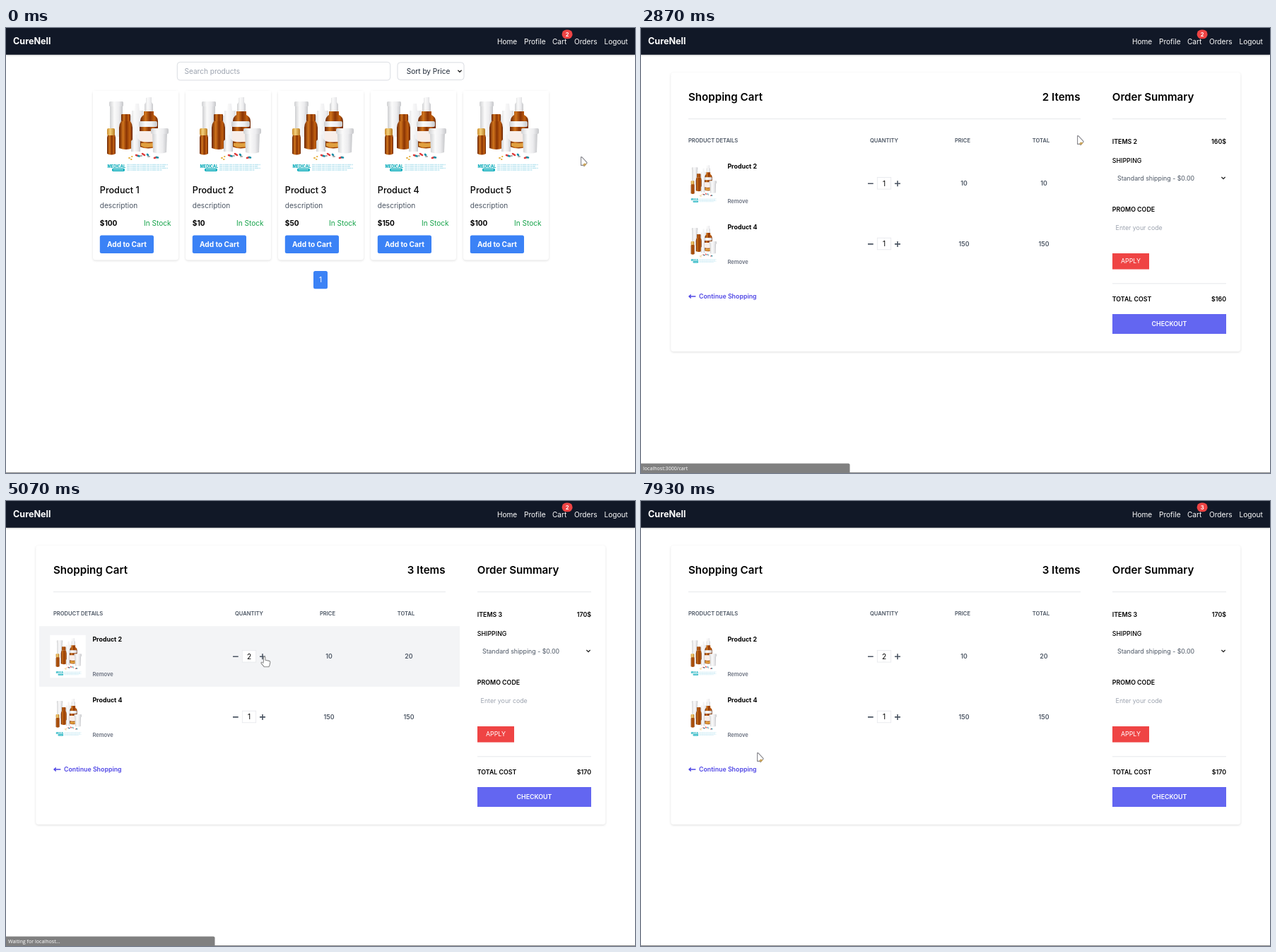
Animation, 890 px wide and 630 px high, one loop 8000 ms. Source, as an HTML page:

```html
<!DOCTYPE html>
<html lang="en">
<head>
<meta charset="utf-8">
<title>Shop</title>
<style>
html, body { margin: 0; width: 100%; height: 100%; overflow: hidden; background: #fff; }
svg { display: block; width: 890px; height: 630px; font-family: Inter, sans-serif; }
.card { fill: #fff; filter: drop-shadow(0 1.8px 1.5px rgba(0,0,0,.13)); }
.status { font-family: "Open Sans", sans-serif; }
</style>
</head>
<body>
<svg viewBox="0 0 890 630">
  <defs>
    <linearGradient id="amber">
      <stop offset="0" stop-color="#6b2504"/><stop offset=".3" stop-color="#d0741c"/>
      <stop offset=".55" stop-color="#8a3505"/><stop offset=".8" stop-color="#c2600f"/><stop offset="1" stop-color="#6b2504"/>
    </linearGradient>
    <linearGradient id="white">
      <stop offset="0" stop-color="#cfd0d2"/><stop offset=".35" stop-color="#fafafa"/>
      <stop offset=".7" stop-color="#ececee"/><stop offset="1" stop-color="#c6c7ca"/>
    </linearGradient>
    <linearGradient id="gold">
      <stop offset="0" stop-color="#c98a2b"/><stop offset=".4" stop-color="#f3cf7a"/><stop offset="1" stop-color="#b97a20"/>
    </linearGradient>
    <g id="photo">
      <rect width="121" height="121" fill="#fff"/>
      <g fill="url(#white)">
        <rect x="24" y="19" width="18" height="46" rx="1.5"/>
        <rect x="23" y="15" width="20" height="7" rx="1.5"/>
        <path d="M60 18h5l1 10h5v7h4v41H50V35h5v-7h4z"/>
        <path d="M75 10l3-1h5v7l2 3v10H73V19l2-3z"/>
      </g>
      <path d="M72 29h14v5q6 3 6 9v35H67V43q0-6 5-9z" fill="url(#amber)"/>
      <g fill="url(#amber)">
        <path d="M40 43h13q3 4 3 9v29q-9 4-19 0V52q0-5 3-9z"/>
        <path d="M21 62h10l1 4v23q-6 3-12 0V66z"/>
        <path d="M66 50h24v29q-12 5-24 0z"/>
      </g>
      <rect x="40" y="33" width="13" height="10" rx="1" fill="url(#amber)"/>
      <rect x="20" y="53" width="11" height="10" rx="2" fill="url(#gold)"/>
      <path d="M66 57h24v14q-12 3-24 0z" fill="#f8eee9"/>
      <path d="M68 74h20v4q-10 4-20 0z" fill="#e0a040"/>
      <g fill="url(#white)">
        <rect x="65" y="43" width="26" height="8" rx="2"/>
        <path d="M84 59h21l-1 28q-9 3-19 0z"/>
        <rect x="82" y="53" width="25" height="8" rx="2"/>
        <path d="M58 62h5v5l4 4v15H54V71l4-4z"/>
      </g>
      <g stroke-width="2.6" stroke-linecap="round">
        <path d="M61 91l3 1M70 89l3 2M87 95l3-1" stroke="#df3c3c"/>
        <path d="M64 92l2 .5M90 94l2 .5M77 90l1 1" stroke="#168da5"/>
        <path d="M51 95h1M55 93h.5M54 97h.5" stroke="#e6b040" stroke-width="2"/>
        <path d="M67 92h2M78 93h2" stroke="#aaa" stroke-width="2"/>
      </g>
      <text x="20.5" y="108.6" font-size="5.6" font-weight="800" fill="#12aebc">MEDICAL</text>
      <rect x="27" y="109.7" width="18" height="4.2" rx="1.6" fill="#12aebc"/>
      <path d="M29 111.8h14" stroke="#d5f4f6" stroke-width="1.3" stroke-dasharray="1.5 .5"/>
      <path d="M48 104.5h58M48 107h54M48 109.5h58M48 112h50" stroke="#bfe6f1" stroke-width="1.3" stroke-dasharray="4 .7 2 .6 6 .8"/>
    </g>
  </defs>
  <g id="stage"></g>
</svg>
<script>
const stage = document.getElementById('stage');
const TICKS = 120, LOOP = 8000;
const BASE = 10.08, SMALL = 8.82, TINY = 7.56;   // text sizes
const INK = '#000', GRAY = '#4b5563', PALE = '#9ca3af', LINE = '#e5e7eb';
const BLUE = '#3b82f6', INDIGO = '#6366f1', RED = '#ef4444';

const text = (x, y, s, size = BASE, weight = 400, fill = INK, anchor = 'start') =>
  `<text x="${x}" y="${y}" font-size="${size}" font-weight="${weight}" fill="${fill}" text-anchor="${anchor}">${s}</text>`;
const rect = (x, y, w, h, fill, r = 0, more = '') =>
  `<rect x="${x}" y="${y}" width="${w}" height="${h}" rx="${r}" fill="${fill}" ${more}/>`;
const path = (d, color, w = 1, more = '') =>
  `<path d="${d}" stroke="${color}" stroke-width="${w}" fill="none" ${more}/>`;
const chevron = (x, y) => path(`M${x - 2.6} ${y - 1.3}l2.6 2.6l2.6-2.6`, '#222', 1.3);
const card = (x, y, w, h) => rect(x, y, w, h, '#fff', 4, 'class="card"');

// pointer stops: tick, x, y
const stops = [
  [0, 813, 182], [8, 813, 182], [20, 782.5, 19], [21, 782.5, 19], [23, 782.5, 18], [30, 782.5, 18],
  [40, 617, 152], [43, 617, 152], [54, 398, 290], [55, 396, 285], [63, 378, 224], [65, 366, 220],
  [83, 366, 220], [84, 366.5, 225], [96, 366.5, 225], [102, 700, 322], [104, 714, 326],
  [106, 717, 337], [107, 720, 351], [110, 738, 413], [113, 738, 413], [116, 460, 306], [119, 164, 356], [120, 164, 356]
];
function pointer(n) {
  const i = stops.findIndex((s, k) => n < (stops[k + 1] || [Infinity])[0]);
  const [t0, x0, y0] = stops[i], [t1, x1, y1] = stops[i + 1] || stops[i];
  let p = t1 > t0 ? (n - t0) / (t1 - t0) : 0;
  if (t1 - t0 > 5) p = p * p * (3 - 2 * p);
  return [x0 + (x1 - x0) * p, y0 + (y1 - y0) * p];
}

function header(count, shift, hot) {
  const links = [['Home', 695], ['Profile', 733], ['Cart', 773], ['Orders', 804], ['Logout', 846.5]];
  return rect(0, 0, 890, 37.8, '#111827', 0, 'style="filter:drop-shadow(0 1px 1px #0003)"') +
    text(10, 23.4, 'CureNell', 12.6, 700, '#fff') +
    links.map(([s, x]) => text(x - shift, 22.9, s, BASE, 400, hot && s == 'Cart' ? PALE : '#fff')).join('') +
    rect(786.6 - shift, 2.5, 15, 12.8, RED, 6.4) +
    text(794.1 - shift, 11.6, count, TINY, 700, '#fff', 'middle');
}

function shop() {
  const field = 'stroke="#d1d5db" stroke-width=".8"';
  let s = rect(242.3, 48.3, 301.4, 25.6, '#fff', 4, field) + text(252.5, 65, 'Search products', BASE, 400, PALE) +
    rect(554, 48.8, 94, 24.6, '#fff', 4, field) + text(566.8, 65, 'Sort by Price', BASE, 400, '#1f2937') + chevron(642, 61);
  [100, 10, 50, 150, 100].forEach((price, i) => {
    const x = 123 + 131 * i, left = x + 9.8;
    s += card(x, 89, 121, 239.5) + `<use href="#photo" x="${x}" y="89"/>` +
      text(left, 233.8, 'Product ' + (i + 1), 12.6, 500) +
      text(left, 254.6, 'description', BASE, 400, GRAY) +
      text(left, 279.6, '$' + price, BASE, 700) +
      text(x + 110.5, 279.6, 'In Stock', BASE, 400, '#16a34a', 'end') +
      rect(left, 293.5, 76.2, 25.4, BLUE, 2.5) + text(x + 48, 310, 'Add to Cart', BASE, 700, '#fff', 'middle');
  });
  return s + rect(435, 344, 20, 25.2, BLUE, 2.5) + text(445, 360.2, '1', BASE, 400, '#fff', 'middle');
}

function row(y, name, qty, price, hot) {
  const strong = (x, v) => text(x, y + 46.2, v, SMALL, 600, GRAY, 'middle');
  return (hot ? rect(47, y, 595, 85.7, '#f3f4f6') : '') +
    `<use href="#photo" transform="translate(62.3 ${y + 12.6}) scale(.417 .5)"/>` +
    text(122.4, y + 22, name, SMALL, 700) +
    text(122.4, y + 70.6, 'Remove', TINY, 600, '#6b7280') +
    path(`M321 ${y + 43}h7.7M359 ${y + 43}h8M363 ${y + 39}v8`, GRAY, 1.6) +
    rect(334.3, y + 34.3, 19.4, 16.6, '#fff', 0, `stroke="${LINE}" stroke-width=".8"`) +
    text(344, y + 46.5, qty, BASE, 400, INK, 'middle') + strong(457, price) + strong(570, price * qty);
}

function cart(qty, x, y) {
  const total = 150 + 10 * qty, items = qty + 1;
  const over = (l, t, r, b) => x >= l && x < r && y >= t && y < b;
  const label = (y, s, w = 600) => text(666.8, y, s, SMALL, w);
  const right = (y, s) => text(828, y, s, SMALL, 600, INK, 'end');
  return card(42.3, 63, 806, 395) +
    text(67, 103.4, 'Shopping Cart', 15.12, 600) + text(621.5, 103.4, items + ' Items', 15.12, 600, INK, 'end') +
    text(666.8, 103.4, 'Order Summary', 15.12, 600) +
    path('M67 128.7H622M667 128.7H828M667 361.8H828', LINE) +
    text(67, 161.9, 'PRODUCT DETAILS', TINY, 600, GRAY) +
    [['QUANTITY', 344], ['PRICE', 455], ['TOTAL', 566]].map(([s, x]) => text(x, 161.9, s, TINY, 600, GRAY, 'middle')).join('') +
    row(177.2, 'Product 2', qty, 10, over(47, 177, 642, 263)) +
    row(262.9, 'Product 4', 1, 150, over(47, 263, 642, 348)) +
    path('M68 380h9.4M70.7 377.5l-2.6 2.5l2.6 2.5', '#4f46e5', 1.5) +
    text(82, 383.2, 'Continue Shopping', SMALL, 600, '#4f46e5') +
    label(163.9, 'ITEMS ' + items) + right(163.9, total + '$') + label(191, 'SHIPPING', 500) +
    text(674, 216, 'Standard shipping - $0.00', SMALL, 400, GRAY) + chevron(824, 212.3) +
    label(260.4, 'PROMO CODE') + text(671.6, 285.6, 'Enter your code', SMALL, 400, PALE) +
    rect(667, 319, 52, 22.6, over(667, 319, 719, 342) ? '#dc2626' : RED) +
    text(693, 333.4, 'APPLY', SMALL, 400, '#fff', 'middle') +
    label(387, 'TOTAL COST') + right(387, '$' + total) +
    rect(667, 405, 161, 28, over(667, 405, 828, 433) ? '#4f46e5' : INDIGO) +
    text(747.5, 422.2, 'CHECKOUT', SMALL, 600, '#fff', 'middle');
}

const empty = () =>
  text(440.3, 343.2, 'Your cart is empty', 22.68, 700, INK, 'middle') +
  rect(385.5, 358, 109.5, 25.2, INDIGO, 2.5) +
  text(440.3, 374.2, 'Continue shopping', BASE, 400, '#fff', 'middle') +
  rect(881, 0, 9, 630, '#fcfcfc') + rect(882.6, 12, 5.6, 572, '#8b8b8b', 2.8) +
  '<path d="M885.4 3l3 4.5h-6zM885.4 628l3-4.5h-6z" fill="#8b8b8b"/>';

function status(n) {
  const first = n < 60;
  const alpha = first ? Math.min((n - 17) / 5, (51 - n) / 4, 1) : n >= 75 && n < 83 ? (n < 76 ? .6 : 1) : 0;
  if (alpha <= 0) return '';
  const wide = first ? 70.5 + 225 * Math.max(0, Math.min(1, (n - 29) / 4)) : 295.5;
  return `<g class="status" opacity="${alpha}">` + rect(-3, 616.6, wide + 3, 17, '#808080', 2) +
    text(3, 626, first ? 'localhost:3000/cart' : 'Waiting for localhost...', 7.1, 400, '#fff') + '</g>';
}

const arrow = '<path d="M.6 .6V12.4H3.6L5 13.6L9 9.2V8.4L2 .9Z" fill="#fff" stroke="#85858c" stroke-width="1.1" stroke-linejoin="round"/>' +
  '<path d="M3 12l2-2.4l3.6.6l-2.3 3.2z" fill="#c9a45c"/>';
const hand = '<path d="M-1.6 8.5V1.5Q-1.6.4-.4.4T.9 1.5V5.2L6.4 6.4Q8 6.8 7.8 8.4L7 12.6L5.8 14.8H-.6L-4.8 9.8Q-5.4 8.6-4.2 8.2Q-3 8-1.6 9.6" ' +
  'fill="#fff" stroke="#8a8a8a" stroke-width="1.1" stroke-linejoin="round"/>';

function draw(n) {
  const [x, y] = pointer(n);
  const isShop = n < 28, isEmpty = !isShop && n < 34 || n >= 83 && n < 94;
  const onCart = n >= 18 && n < 31;
  const pressing = onCart || n >= 67 && n < 97 || n >= 103 && n < 106 || n >= 109 && n < 114;
  stage.innerHTML =
    (isShop ? shop() : isEmpty ? '' : cart(n < 72 ? 1 : 2, x, y)) +
    header(n < 83 ? 2 : 3, isEmpty ? 9.5 : 0, onCart) + (isEmpty ? empty() : '') +
    rect(0, 629, 890, 1, '#8c8c8c') + status(n) +
    `<g transform="translate(${x} ${y})">${pressing ? hand : arrow}</g>`;
}

let last = -1;
function tick() {
  const n = Math.floor((performance.now() % LOOP + 5) * TICKS / LOOP) % TICKS;
  if (n !== last) draw(last = n);
  requestAnimationFrame(tick);
}
tick();
</script>
</body>
</html>
```
